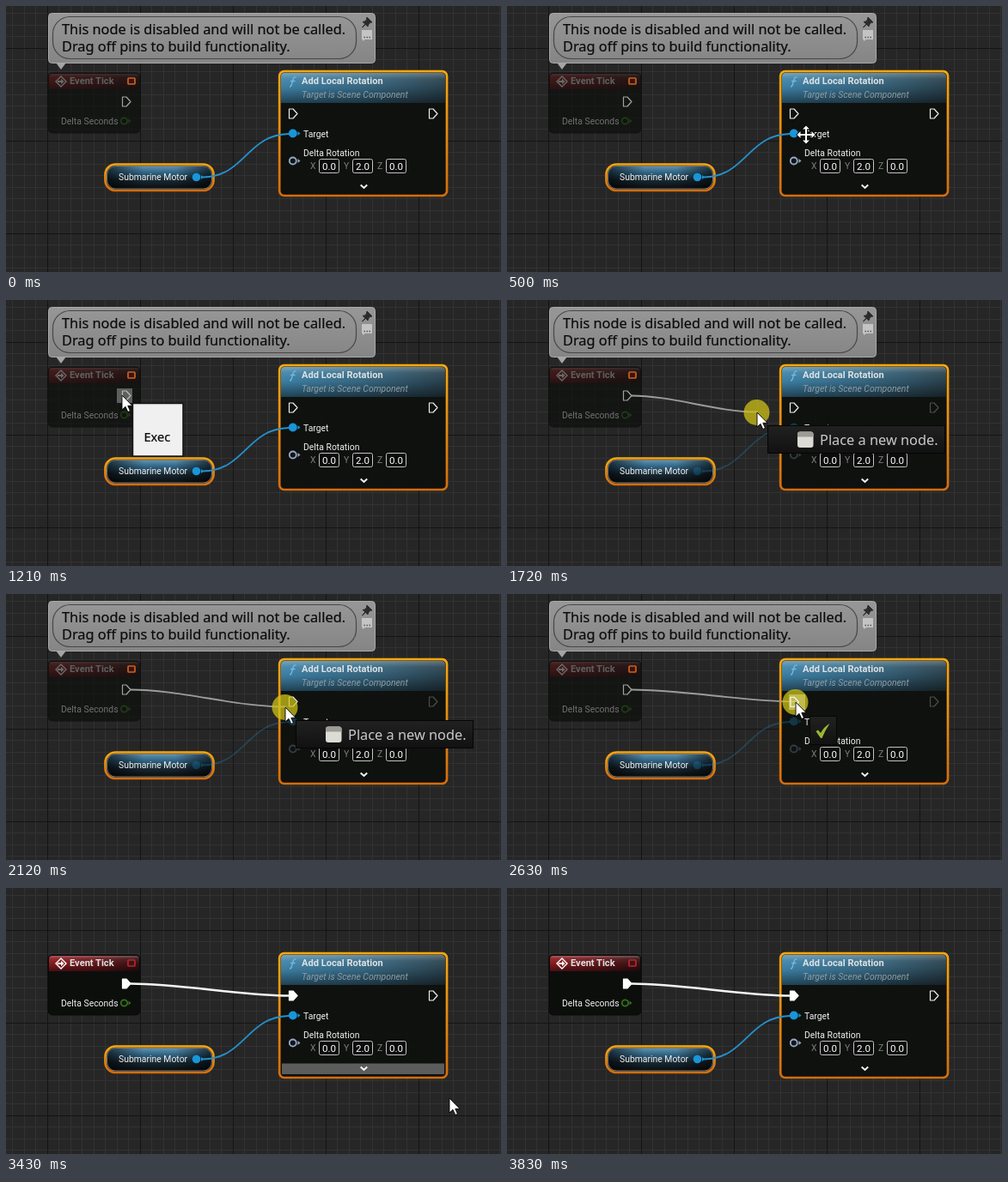
These frames come from a looping animation (576x310 px, 4230 ms). An HTML page:

```html
<!DOCTYPE html>
<html lang="en">
<head>
<meta charset="utf-8">
<title>Connecting a disabled event node</title>
<style>
  html, body { margin: 0; width: 100%; height: 100%; overflow: hidden; background: #262626; }
  svg { display: block; width: 576px; height: 310px; }
  text { font-family: Roboto, Arial, sans-serif; font-size: 10.4px; fill: #f0f0f0; }
  .title { font-size: 11.1px; font-weight: 700; fill: #dde2e4; }
  .sub { font-style: italic; fill: #8f9ca3; }
  .axis { fill: #7d7d7d; }
  .value { font-size: 11.6px; fill: #fff; }
  .note, .tip { font-family: "Noto Sans", "Open Sans", sans-serif; font-size: 16.33px; fill: #0c0c0c; }
  .note { stroke: #0c0c0c; stroke-width: .2; }
  .tip { fill: #c9c9c9; }
  .exec { fill: none; stroke: #eee; stroke-width: 1.2; stroke-linejoin: round; }
  .plugged { fill: #fff; stroke: #fff; }
  .line { fill: none; stroke-linecap: round; }
  .off .body { opacity: .7; }
  .off .head { opacity: .36; }
  .off .label { opacity: .42; }
  .off .ring { opacity: .4; }
  .dim .other { opacity: .28; }
  .hide { display: none; }
</style>
</head>
<body>
<svg id="stage" viewBox="0 0 576 310">
  <defs>
    <pattern id="minor" x="48" y="49" width="27" height="27" patternUnits="userSpaceOnUse">
      <path d="M.5 0V27M13.500 0V27M0 .5H27M0 13.500H27" stroke="#323232"/>
    </pattern>
    <pattern id="major" x="48" y="49" width="108" height="108" patternUnits="userSpaceOnUse">
      <path d="M.5 0V108M0 .5H108" stroke="#141414"/>
    </pattern>
    <linearGradient id="orange" x2="0" y2="1">
      <stop stop-color="#f9a80f"/><stop offset="1" stop-color="#d46c0c"/>
    </linearGradient>
    <linearGradient id="blue">
      <stop stop-color="#3f84aa"/><stop offset=".5" stop-color="#386a85"/><stop offset="1" stop-color="#2a424e"/>
    </linearGradient>
    <linearGradient id="red">
      <stop stop-color="#8e1d21"/><stop offset=".55" stop-color="#69191c"/><stop offset="1" stop-color="#351214"/>
    </linearGradient>
    <linearGradient id="shade" x2="0" y2="1">
      <stop stop-color="#fff" stop-opacity=".28"/><stop offset=".2" stop-color="#fff" stop-opacity=".06"/>
      <stop offset=".5" stop-opacity=".06"/><stop offset="1" stop-opacity=".5"/>
    </linearGradient>
    <linearGradient id="pill" x2="0" y2="1">
      <stop stop-color="#6390aa"/><stop offset=".25" stop-color="#33698a"/>
      <stop offset=".6" stop-color="#1a2c37"/><stop offset="1" stop-color="#0b0e10"/>
    </linearGradient>
    <linearGradient id="sides">
      <stop stop-opacity=".65"/><stop offset=".35" stop-opacity="0"/>
      <stop offset=".65" stop-opacity="0"/><stop offset="1" stop-opacity=".65"/>
    </linearGradient>
    <linearGradient id="grey" x2="0" y2="1">
      <stop stop-color="#979797"/><stop offset="1" stop-color="#858585"/>
    </linearGradient>
    <linearGradient id="panel" x2="0" y2="1">
      <stop stop-color="#212121"/><stop offset="1" stop-color="#111"/>
    </linearGradient>
    <path id="pin" d="M.5 .5H5L10 6L5 11.5H.5Z"/>
    <path id="nib" d="M0-2.6L3 0L0 2.6Z"/>
  </defs>

  <rect width="576" height="310" fill="#262626"/>
  <rect width="576" height="310" fill="url(#minor)"/>
  <rect width="576" height="310" fill="url(#major)"/>

  <!-- event node -->
  <g id="tick">
    <rect class="body" x="49" y="78" width="107" height="70" rx="5" fill="#0c0e0c" stroke="#080808"/>
    <g class="head">
      <path d="M50 97V83Q50 79 54 79H151Q155 79 155 83V97Z" fill="url(#red)"/>
      <path d="M50 97V83Q50 79 54 79H151Q155 79 155 83V97Z" fill="url(#shade)"/>
      <path d="M64 82L70 88L64 94L58 88Z" fill="none" stroke="#fff" stroke-width="1.4"/>
      <path d="M60 87H64V84.800L67.500 88L64 91.200V89H60Z" fill="#fff"/>
      <text class="title" x="74" y="91">Event Tick</text>
    </g>
    <text class="label" x="64" y="138">Delta Seconds</text>
    <g class="ring">
      <circle cx="137.500" cy="134" r="3.700" fill="#0c140a" stroke="#35701c" stroke-width="1.8"/>
      <use href="#nib" x="142.500" y="134" fill="#35701c"/>
    </g>
  </g>
  <rect id="badge" x="142" y="84" width="8" height="7" rx="1" fill="#3a1513" stroke-width="1.7"/>
  <rect id="hoverOut" x="129" y="103" width="18" height="17" fill="#777" opacity=".75"/>
  <use id="tickPin" class="exec" href="#pin" x="135" y="105.500"/>

  <!-- comment bubble -->
  <g id="bubble">
    <path d="M58 66H70L64 74Z" fill="#a5a5a5"/>
    <rect x="49.500" y="8.500" width="380" height="58" rx="4" fill="url(#grey)" stroke="#a9a9a9"/>
    <rect x="54.500" y="12.500" width="353" height="49" rx="20" fill="none" stroke="#474747" stroke-width="1.2"/>
    <text class="note" x="65" y="33">This node is disabled and will not be called.</text>
    <text class="note" x="65" y="53">Drag off pins to build functionality.</text>
    <path d="M420 13L426 19L423.500 19.500L421.500 22L421 24L418.500 21.500L414.500 25L418 21L415 18.500L417.500 18L419.500 16Z" fill="#2c2c2c" stroke="#2c2c2c"/>
    <path d="M414 28H426V39H418L415 41V39H414Z" fill="#c4c4c4"/>
    <path d="M416.500 36.500H424" stroke="#555" stroke-width="1.5" stroke-dasharray="1.500 1.500"/>
  </g>

  <!-- rotation node -->
  <rect x="318.200" y="76.200" width="194.800" height="144.800" rx="5.500" fill="#0d100d" fill-opacity=".92" stroke="url(#orange)" stroke-width="2.700"/>
  <path d="M320 113V82Q320 78 324 78H507Q511 78 511 82V113Z" fill="url(#blue)"/>
  <path d="M320 113V82Q320 78 324 78H507Q511 78 511 82V113Z" fill="url(#shade)"/>
  <path d="M330 94Q332 94 332.800 90L334 85.500Q334.800 82.500 337.500 83M331 87.500H336.500" fill="none" stroke="#72b9de" stroke-width="1.3"/>
  <text class="title" x="344" y="91">Add Local Rotation</text>
  <text class="sub" x="344" y="107">Target is Scene Component</text>
  <use id="inPin" class="exec" href="#pin" x="329" y="119.500"/>
  <use class="exec other" href="#pin" x="492" y="119.500"/>
  <text x="346" y="153">Target</text>
  <text x="346" y="175">Delta Rotation</text>
  <g class="other">
    <circle cx="333.800" cy="148.500" r="5" fill="#1995d8"/>
    <use href="#nib" x="339.500" y="148.500" fill="#1995d8"/>
    <circle cx="333.800" cy="180.500" r="4" fill="#11161a" stroke="#9aa9c6" stroke-width="1.8"/>
    <use href="#nib" x="339.500" y="180.500" fill="#9aa9c6"/>
  </g>
  <g id="fields"></g>
  <rect id="strip" x="321" y="204.500" width="189" height="12.500" fill="#5c5c5c"/>
  <path d="M412.700 208.500L416.500 212L420.200 208.500" fill="none" stroke="#fff" stroke-width="1.9"/>

  <!-- variable node -->
  <rect x="115.500" y="184.500" width="126" height="30.500" rx="12" fill="#0b0d0f" stroke="url(#orange)" stroke-width="2.700"/>
  <rect x="118" y="187" width="121" height="25.500" rx="10" fill="url(#pill)"/>
  <rect x="118" y="187" width="121" height="25.500" rx="10" fill="url(#sides)"/>
  <rect x="117.500" y="186.500" width="122" height="26.500" rx="10" fill="none" stroke="#c9d2d7" stroke-opacity=".55"/>
  <text x="131" y="203">Submarine Motor</text>
  <g class="other">
    <path class="line" d="M229 199.500C278 199 280 150 329 149" stroke="#2490cc" stroke-width="1.8"/>
    <circle cx="221.500" cy="199.500" r="4.800" fill="#1995d8"/>
    <use href="#nib" x="227" y="199.500" fill="#1995d8"/>
  </g>

  <path id="wire" class="line"/>

  <g id="execTip">
    <rect x="147.500" y="120.500" width="58.500" height="61.500" fill="#f0f0f0" stroke="#141414" stroke-width="1.5"/>
    <text class="note" x="160.500" y="165" style="font-size:14.6px">Exec</text>
  </g>

  <g id="pointer">
    <circle id="press" r="15" cx="-.5" fill="#d0c318" opacity=".74"/>
    <g id="hoverIn">
      <rect x="-8" y="-9" width="19" height="18" fill="#f4ee9c" opacity=".42"/>
      <use class="exec" href="#pin" x="-6.500" y="-6"/>
    </g>
    <g id="placeTip">
      <rect x="12.500" y="15.500" width="206" height="32" fill="url(#panel)" stroke="#050505"/>
      <rect x="47" y="22.500" width="18.500" height="18.500" rx="3" fill="#dddbd5"/>
      <path d="M47 28.500V25.500Q47 22.500 50 22.500H62.500Q65.500 22.500 65.500 25.500V28.500Z" fill="#9d9b95"/>
      <text class="tip" x="73" y="38">Place a new node.</text>
    </g>
    <g id="checkTip">
      <rect x="16.500" y="16.500" width="31" height="33" fill="url(#panel)" stroke="#070707"/>
      <path d="M23.500 34L26 32.500L29 36Q33 28.500 39.500 25Q34 33 30.500 42H29Z" fill="#9ab733"/>
    </g>
    <path id="arrow" d="M0 0V17L4 13.300L6.800 19.500L9.500 18.300L6.800 12.300H12Z" fill="#fff" stroke="#000" stroke-width=".9"/>
    <path id="cross" d="M0-10.500L4-6.500H1V-1H6.500V-4L10.500 0L6.500 4V1H1V6.500H4L0 10.500L-4 6.500H-1V1H-6.500V4L-10.500 0L-6.500-4V-1H-1V-6.500H-4Z" fill="#fff" stroke="#000" stroke-width="1.600" paint-order="stroke"/>
  </g>
</svg>
<script>
const LOOP = 4230;
const $ = id => document.getElementById(id);
const show = (id, on) => $(id).classList.toggle('hide', !on);

// time, x, y of the pointer; each place holds until the next
const path = [
  [100, 497, 290], [200, 480, 236], [300, 458, 178],
  [500, 348, 150], [600, 228, 124], [700, 135, 111],
  [1410, 160, 115], [1510, 205, 122], [1620, 255, 128], [1720, 291, 131],
  [1810, 301, 133], [1910, 310, 134], [2010, 318, 133], [2120, 325, 132], [2220, 330, 130],
  [2430, 333, 128], [2530, 335, 127], [2630, 336, 126],
  [3230, 372, 156], [3330, 442, 208], [3430, 516, 245],
  [3530, 538, 278], [3630, 552, 299], [3730, 555, 304]
];

$('fields').innerHTML = [['X', '0.0'], ['Y', '2.0'], ['Z', '0.0']].map(([name, v], i) => {
  const x = 354 + i * 39;
  return `<text class="axis" x="${x}" y="190">${name}</text>
    <rect x="${x + 10.5}" y="178.500" width="23" height="16" rx="2" fill="#0b0b0b" stroke="#c4c4c4"/>
    <text class="value" x="${x + 14}" y="190.500">${v}</text>`;
}).join('');

function setWire(x, y, color, width) {
  const reach = (x - 145) * .32;
  const w = $('wire');
  w.setAttribute('d', `M145 111.5C${145 + reach} 111.5 ${x - reach} ${y} ${x} ${y}`);
  w.setAttribute('stroke', color);
  w.setAttribute('stroke-width', width);
}

function draw(t) {
  const within = (a, b) => t >= a && t < b;
  const spot = path.filter(p => p[0] <= t).pop();
  const [, x, y] = spot || [0, 0, 0];
  const live = t >= 3130;
  const pressed = within(1310, 3130);
  const drag = within(1410, 3130);
  const move = within(500, 600) || within(700, 900);

  show('pointer', within(100, 3830));
  $('pointer').setAttribute('transform', `translate(${x} ${y})`);
  show('arrow', !move);
  show('cross', move);
  show('press', pressed);
  show('hoverOut', within(900, 1410));
  show('execTip', within(900, 1310));
  show('placeTip', within(1410, 2430));
  show('checkTip', within(2430, 3130));
  show('hoverIn', within(2430, 3130));
  show('strip', within(3330, 3530));
  show('bubble', !live);

  $('stage').classList.toggle('dim', drag);
  $('tick').classList.toggle('off', !live);
  $('badge').setAttribute('stroke', live ? '#b8252f' : '#cc621f');
  $('tickPin').style.opacity = live ? 1 : .65;
  $('tickPin').classList.toggle('plugged', live);
  $('inPin').classList.toggle('plugged', live);

  show('wire', drag || live);
  if (live) setWire(330, 125.5, '#f4f4f4', 2.6);
  else if (drag) setWire(x, y - .5, '#9c9c9c', 1.8);
}

const start = performance.now();
function tick() {
  draw((performance.now() - start) % LOOP);
  requestAnimationFrame(tick);
}
tick();
</script>
</body>
</html>
```
